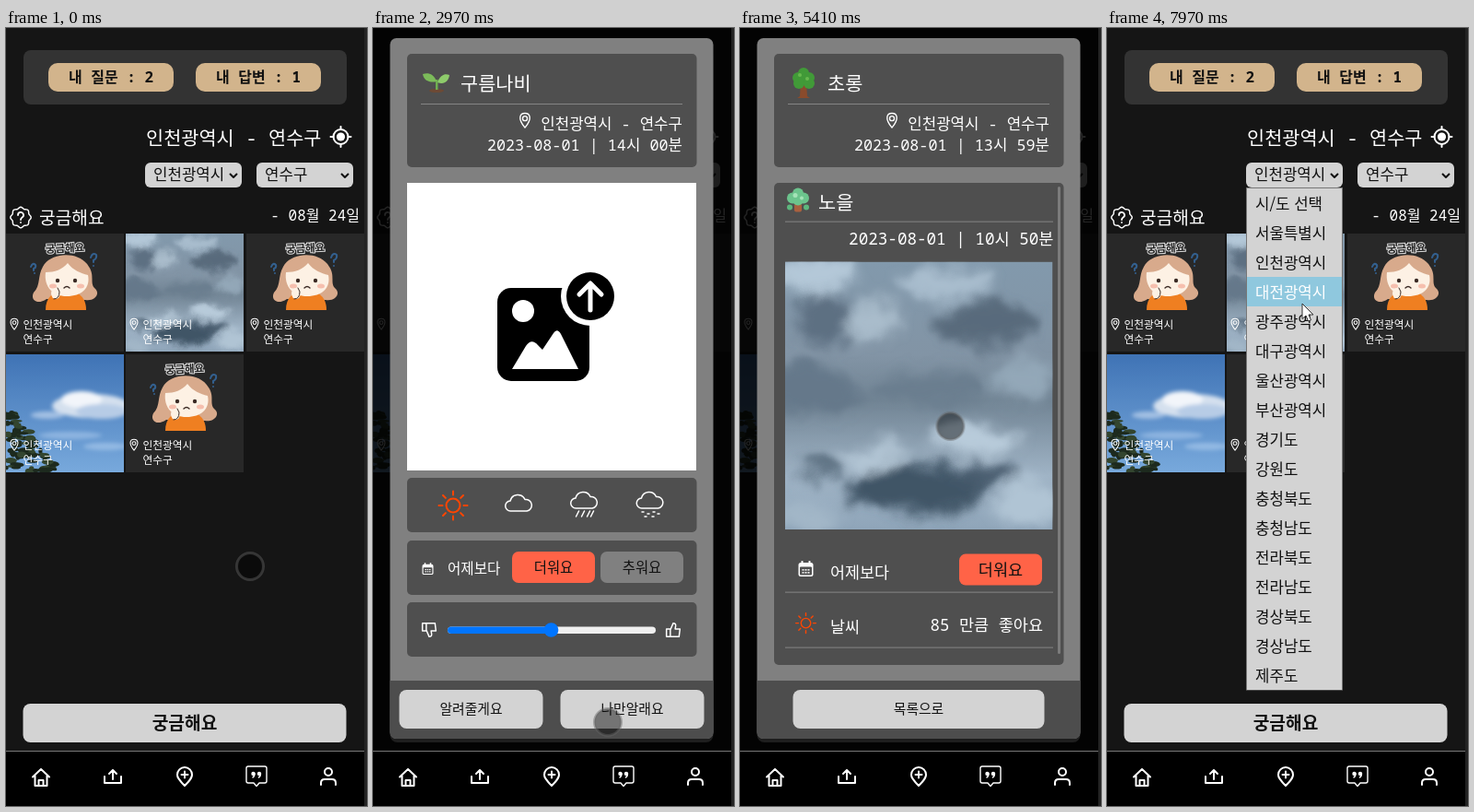
Animation, 392 px wide and 844 px high, one loop 8 s. Source, as an HTML page:

```html
<!DOCTYPE html>
<html lang="ko">
<head>
<meta charset="utf-8">
<style>
html, body { margin: 0; width: 100%; height: 100%; overflow: hidden; background: #151515; }
svg { position: absolute; left: 0; top: 0; }
text { font-family: "Noto Sans Mono", "Noto Sans CJK KR", "Noto Sans CJK JP", monospace; }
.sans { font-family: "Noto Sans CJK KR", "Noto Sans CJK JP", sans-serif; font-weight: 350; }
.line { fill: none; stroke: #fff; stroke-width: 2; stroke-linejoin: round; stroke-linecap: round; }
.thin { stroke-width: 1.4; }
.pointer { will-change: transform; overflow: visible; }
</style>
</head>
<body>
<script>
const LOOP = 8000;
const box = (x, y, w, h, fill, r = 0) =>
  `<rect x="${x}" y="${y}" width="${w}" height="${h}" rx="${r}" fill="${fill}"/>`;
const oval = (x, y, rx, ry, fill) => `<ellipse cx="${x}" cy="${y}" rx="${rx}" ry="${ry}" fill="${fill}"/>`;
const dot = (x, y, r, fill) => oval(x, y, r, r, fill);
const path = (d, fill) => `<path d="${d}" fill="${fill}"/>`;
const line = (d, cls = '', style = '') => `<path class="line ${cls}" d="${d}" style="${style}"/>`;
const put = (id, x, y, k = 1) => `<use href="#${id}" transform="translate(${x} ${y}) scale(${k})"/>`;
const text = (x, y, size, str, fill = '#fff', anchor = 'start', weight = 400, cls = '') =>
  `<text x="${x}" y="${y}" font-size="${size}" fill="${fill}" text-anchor="${anchor}" font-weight="${weight}" class="${cls}">${str}</text>`;
const button = (x, y, w, h, fill, label, size, weight = 500, r = 8) =>
  box(x, y, w, h, fill, r) + text(x + w / 2, y + h / 2 + size * .37, size, label, '#111', 'middle', weight);
const rule = (x1, x2, y) => box(x1, y, x2 - x1, 1, '#858585');

let seed = 7;
const rnd = () => (seed = seed * 16807 % 2147483647) / 2147483647;

const clouds = [
  [16, 6, 18, 8, '#b4c8d8'], [75, 10, 25, 7, '#a9bdce'], [97, 30, 24, 10, '#586b7c'],
  [18, 28, 14, 13, '#5d7082'], [42, 28, 12, 9, '#a9bccb'], [14, 62, 22, 12, '#65788a'],
  [70, 60, 30, 8, '#6b7e8f'], [112, 55, 16, 9, '#93a7b8'], [90, 84, 22, 8, '#b8cbda'],
  [44, 94, 18, 6, '#b3c6d5'], [62, 109, 34, 12, '#405466'], [94, 102, 14, 5, '#4b5f71'],
  [15, 101, 12, 4, '#566a7c'], [116, 114, 14, 10, '#b0c4d4'], [12, 121, 16, 6, '#a3b7c8']
].map(c => oval(...c)).join('');

const leaves = Array.from({ length: 85 }, () => {
  const y = 64 + rnd() * 64, reach = 10 + (y - 64) * .75;
  return oval(rnd() * reach, y, 2 + rnd() * 5, 1.5 + rnd() * 2, rnd() < .6 ? '#1d2a1e' : '#33452f');
}).join('');

const badge = Array.from({ length: 72 }, (_, i) => {
  const a = i * Math.PI / 36, r = 10.4 + .8 * Math.cos(8 * a);
  return `${(r * Math.cos(a)).toFixed(1)} ${(r * Math.sin(a)).toFixed(1)}`;
}).join('L');

const rays = Array.from({ length: 8 }, (_, i) => {
  const c = Math.cos(i * Math.PI / 4), s = Math.sin(i * Math.PI / 4);
  return `M${c * 11.5} ${s * 11.5}L${c * 15.5} ${s * 15.5}`;
}).join('');
const cloudLine = 'M-9 5a5.5 5.5 0 0 1-.5-11a8.5 8.5 0 0 1 16-1.5a6.3 6.3 0 0 1 2 12.5Z';

const defs = `<defs>
<clipPath id="sq"><rect width="128" height="128"/></clipPath>
<clipPath id="card"><rect x="37" y="168" width="314" height="523" rx="5"/></clipPath>
<linearGradient id="grey" x2="0" y2="1"><stop stop-color="#8299ac"/><stop offset=".35" stop-color="#8294a5"/>
<stop offset=".52" stop-color="#718494"/><stop offset=".8" stop-color="#a0b4c6"/><stop offset="1" stop-color="#8fa5b9"/></linearGradient>
<linearGradient id="blue" x2="0" y2="1"><stop stop-color="#3f73b5"/><stop offset="1" stop-color="#78a9dc"/></linearGradient>
<filter id="puff"><feGaussianBlur stdDeviation="3" result="b"/><feTurbulence type="fractalNoise" baseFrequency=".045" numOctaves="3" seed="4"/>
<feDisplacementMap in="b" scale="16" xChannelSelector="R" yChannelSelector="G"/></filter>
<filter id="soft"><feGaussianBlur stdDeviation="2"/></filter>
<g id="sky" clip-path="url(#sq)">${box(0, 0, 128, 128, 'url(#grey)')}<g filter="url(#puff)">${clouds}</g></g>
<g id="day" clip-path="url(#sq)">${box(0, 0, 128, 128, 'url(#blue)')}<g filter="url(#soft)">
${oval(92, 56, 42, 13, '#d4e0ee')}${oval(82, 49, 22, 9, '#f2f5fa')}${oval(104, 62, 28, 8, '#b7cce6')}
${oval(45, 66, 18, 4, '#a3c0e3')}${oval(70, 88, 34, 4, '#8db4e0')}${oval(108, 100, 24, 4, '#93b9e3')}</g>${leaves}</g>
<g id="girl">${box(0, 0, 128, 128, '#282828')}
<text x="64" y="20" font-size="11.5" font-weight="700" text-anchor="middle" transform="rotate(-3 64 16)" fill="#222" stroke="#ddd" stroke-width="2" paint-order="stroke">궁금해요</text>
${path('M40 36C48 20 80 18 90 36C97 46 90 54 97 60C103 66 95 74 86 72L44 71C34 78 26 72 30 64C38 56 34 46 40 36Z', '#d8aa8c')}
${path('M43 83C43 70 50 62 64 62C80 62 87 70 87 83Z', '#ef7f21')}
${path('M43 42C53 42 61 39 67 32C73 40 81 43 89 45C92 59 82 68 66 68C51 68 41 58 43 42Z', '#fdf1e4')}
${dot(56, 51, 2.2, '#3a2a24')}${dot(75, 51, 2.2, '#3a2a24')}${oval(51, 57, 4, 2.5, '#f6bfae')}${oval(81, 57, 4, 2.5, '#f6bfae')}
${line('M63 59q3-3 6 0', 'thin', 'stroke:#3a2a24')}${oval(54, 65, 5, 6, '#fdf1e4')}${line('M52 71q6 0 6-8l-2-4', 'thin', 'stroke:#3a2a24;stroke-width:1')}
<g class="line" style="stroke:#33608f"><path d="M27 36q2-5 5-2q1 3-2 4v2M31 43v.1M92 26q2-6 6-3q1 4-3 6v2M95 35v.1"/></g></g>
<g id="pin" class="line" style="stroke-width:1.1"><path d="M0 6.5C-7-2-4-6 0-6S7-2 0 6.5Z"/><circle cy="-1.5" r="2"/></g>
<g id="sun" class="line" style="stroke:#ff4500;stroke-width:2"><circle r="7.5"/><path d="${rays}"/></g>
<g id="cal">${box(-8, -7, 16, 15, '#fff', 2.5)}${box(-6.5, -2.5, 13, 9, '#4f4f4f', 1)}
${[-4, -1, 2].map(x => box(x, 0, 2, 1.5, '#fff') + box(x, 3, 2, 1.5, '#fff')).join('')}${box(-5, -9, 2, 4, '#fff')}${box(3, -9, 2, 4, '#fff')}</g>
<g id="thumb" class="line thin"><path d="M-7-1h4v8h-4ZM-3 0L0-7q3 0 2.5 3L2-1h5l-1 8h-9"/></g>
<g id="sprout">${path('M-1 5C-3-3-8-3-9-1', 'none')}${oval(0, 9, 8, 2, '#6d4a35')}${box(-1, -3, 2.5, 11, '#6fae50')}
${path('M0-1C-3-10-10-11-15-9C-14-2-7 1 0-1Z', '#7cbb5a')}${path('M1 0C4-8 9-10 14-8C13-1 8 3 1 0Z', '#8ecb6b')}</g>
<g id="tree">${path('M-3 0h6l1 15l3 2h-14l3-2Z', '#8a4b2c')}
${[[0, -10], [-6, -5], [6, -5], [0, -3], [-5, 1], [6, 1]].map(p => dot(...p, 6, '#419a38')).join('')}${dot(-4, -8, 2, '#67b94e')}${dot(4, -4, 2, '#67b94e')}</g>
<g id="bud">${box(-4, 3, 8, 9, '#a9603f', 2)}${[[0, -8], [-6, -3], [6, -3], [0, -1]].map(p => dot(...p, 6, '#6cc48d')).join('')}
${dot(-9, 7, 3, '#5db77d')}${dot(9, 7, 3, '#5db77d')}${dot(-3, -6, 2.5, '#a5e3b8')}${dot(4, -3, 2, '#a5e3b8')}</g>
</defs>`;

const cell = (id, x, y) => put(id, x, y) + put('pin', x + 9, y + 98, .95) +
  text(x + 18.5, y + 102.5, 11.7, '인천광역시') + text(x + 18.5, y + 118.5, 11.7, '연수구');
const select = (x, label) => box(x, 146, 105, 27, '#d3d3d3', 6) +
  text(x + 9, 165, 16.8, label, '#111', 'start', 350, 'sans') +
  line(`M${x + 92} 158l4 4l4-4`, '', 'stroke:#111;stroke-linecap:butt');

const page = box(0, 0, 392, 844, '#151515') +
  box(19, 24, 351, 59, '#333', 8) +
  button(46, 38, 136, 31, '#d2b48c', '내 질문 : 2', 16, 700, 10) +
  button(206, 38, 136, 31, '#d2b48c', '내 답변 : 1', 16, 700, 10) +
  text(342.5, 126.5, 20.8, '인천광역시 - 연수구', '#fff', 'end') +
  `<circle class="line" cx="363.5" cy="118" r="8"/>` + dot(363.5, 118, 4.6, '#fff') +
  line('M363.5 107v3M363.5 126v3M352.500 118h3M371.500 118h3') +
  select(151, '인천광역시') + select(272, '연수구') +
  `<g transform="translate(16 205.500)">${line('M' + badge + 'Z', 'thin')}${line('M-3-2.500a3 3 0 1 1 4.500 2.500q-1.500 1-1.500 2.500M0 5.500v.1', '', 'stroke-width:1.8')}</g>` +
  text(36, 212.5, 19.2, '궁금해요') + text(384, 209, 16, '- 08월 24일', '#fff', 'end') +
  cell('girl', 0, 223) + cell('sky', 130, 223) + cell('girl', 261, 223) +
  cell('day', 0, 354) + cell('girl', 130, 354) +
  button(18.5, 733, 351, 42, '#d3d3d3', '궁금해요', 19.2, 700);

const nav = box(0, 784, 389, 60, '#000') + box(0, 784, 389, 1, '#777') + box(389, 0, 3, 844, '#232323') +
  line('M29 812.500L38 804l9 8.500M31.500 811v11h13v-11M35.500 822v-6h5v6') +
  line('M107 812v7h18v-7M116 815v-9M112 809l4-4l4 4') +
  line('M194 822C185 813 186 811 186 810a8 8 0 0 1 16 0C202 812 202 814 194 822ZM190.500 810h7M194 806.500v7') +
  line('M263 801h18q2 0 2 2v14q0 2-2 2h-6l-3 3.500l-3-3.500h-6q-2 0-2-2v-14q0-2 2-2Z', 'thin') +
  dot(268.5, 809, 2.2, '#fff') + dot(275, 809, 2.2, '#fff') + line('M270 809q0 3-2 4M276.500 809q0 3-2 4', 'thin') +
  line('M342 821v-2q0-4 4-4h8q4 0 4 4v2') + `<circle class="line" cx="350" cy="807" r="4"/>`;

const modal = (icon, name, clock) => box(0, 0, 389, 784, 'rgba(0,0,0,.86)') +
  box(18.5, 11, 351, 760, '#808080', 7) +
  path('M18.500 708h351v56q0 7-7 7h-337q-7 0-7-7Z', '#4d4d4d') +
  box(37, 28, 314.5, 123, '#4f4f4f', 5) + put(icon, 69, 59) + text(95, 68, 20.8, name) + rule(52, 336, 82) +
  put('pin', 165, 100, 1.25) + text(336, 109.5, 16.8, '인천광역시 - 연수구', '#fff', 'end') +
  text(336, 132.5, 16.8, '2023-08-01 | ' + clock, '#fff', 'end');

const form = modal('sprout', '구름나비', '14시 00분') +
  box(37, 168, 314, 312, '#fff') + box(135, 282, 100, 101, '#000', 15) + dot(163, 307, 12, '#fff') +
  path('M151 370L166 345Q172 336 179 344L184 349L196 331Q200 325 204 332L223 370Z', '#fff') +
  dot(236, 291, 32, '#fff') + dot(236, 291, 26, '#000') + line('M236 306v-28M224 289l12-12l12 12', '', 'stroke-width:5') +
  [[488, 59], [556, 59], [623, 59]].map(([y, h]) => box(37, y, 314.5, h, '#4f4f4f', 5)).join('') +
  put('sun', 87, 518) +
  `<g class="line" style="stroke-width:1.5"><path transform="translate(158.500 519)" d="${cloudLine}"/>
   <path transform="translate(229.500 516)" d="${cloudLine}M-6 8l-3 6M0 8l-3 6M6 8l-3 6M10 8l-3 6"/>
   <path transform="translate(301 516)" d="${cloudLine}M-9 9h2M-3 11h2M3 9h2M8 11h2M-6 14h2M2 14h2"/></g>` +
  put('cal', 59.5, 587, .75) + text(81, 592, 15.6, '어제보다') +
  button(151, 568, 90, 34, '#ff6347', '더워요', 15.4, 500, 7) + button(247, 568, 90, 34, '#808080', '추워요', 15.4, 500, 7) +
  put('thumb', 326, 653, 1.05) + `<g transform="translate(61 653) scale(1 -1)">${put('thumb', 0, 0, 1.05)}</g>` +
  box(81, 649.5, 226, 7.5, '#efefef', 4) + box(81, 649.5, 112, 7.5, '#0075ff', 4) + dot(193.5, 653, 7.8, '#0075ff') +
  button(28.5, 718, 156, 42, '#d3d3d3', '알려줄게요', 14.8) + button(203.5, 718, 156, 42, '#d3d3d3', '나만알래요', 14.8);

const detail = modal('tree', '초롱', '13시 59분') + box(37, 168, 314.5, 523, '#4f4f4f', 5) +
  `<g clip-path="url(#card)"><g id="scroll">` +
  put('bud', 63, 194) + text(85, 203, 20.8, '노을') + rule(49, 340, 216) +
  text(340.5, 241, 17.6, '2023-08-01 | 10시 50분', '#fff', 'end') + put('sky', 49, 260, 290.5 / 128) +
  put('cal', 71.5, 593.5) + text(98, 603, 17.4, '어제보다') + button(238, 577, 90, 34, '#ff6347', '더워요', 17.5, 500, 7) + rule(49, 340, 618) +
  put('sun', 71.5, 652, .7) + text(98, 662, 17.4, '날씨') + text(329, 660, 17.5, '85 만큼 좋아요', '#fff', 'end') + rule(49, 340, 678) +
  `</g></g><g id="bar">${box(345, 172, 3, 507, '#7c7c7c', 1.5)}</g>` +
  button(57.5, 718, 273, 42, '#d3d3d3', '목록으로', 14.8);

const regions = ('시/도 선택,서울특별시,인천광역시,대전광역시,광주광역시,대구광역시,울산광역시,부산광역시,' +
  '경기도,강원도,충청북도,충청남도,전라북도,전라남도,경상북도,경상남도,제주도').split(',');
const menu = box(151, 173, 105, 545.5, '#777') + box(152, 174, 103, 544, '#d3d3d3') +
  `<rect id="mark" x="152" width="103" height="32" fill="#8fc8de"/>` +
  regions.map((r, i) => text(161, 196.5 + i * 32, 16.8, r, '#111', 'start', 350, 'sans option')).join('');

document.body.innerHTML = `<svg width="392" height="844">${defs}${page}
<g id="form">${form}</g><g id="detail">${detail}</g><g id="menu">${menu}</g>${nav}</svg>
<svg class="pointer" id="touch" width="1" height="1"><circle r="14.500" fill="rgba(0,0,0,.45)"/>
<circle r="14.500" fill="none" stroke="rgba(100,100,100,.45)" stroke-width="3"/></svg>
<svg class="pointer" id="arrow" width="1" height="1"><path d="M0 0V16.500L4 13L6.500 19L9.500 17.800L7 12H12Z" fill="#fff" stroke="#333"/></svg>`;

const $ = id => document.getElementById(id);
const options = document.querySelectorAll('.option');
const show = (id, on) => $(id).style.display = on ? '' : 'none';
const clamp = v => Math.min(1, Math.max(0, v));
const ease = v => v * v * (3 - 2 * v);

// time, x, y
const touchPath = [[0, 265, 584], [560, 265, 584], [1360, 103, 300], [1640, 103, 300], [2330, 212, 677],
  [2970, 255, 753], [3430, 255, 753], [4230, 215, 299], [4330, 215, 299], [4830, 230, 439], [5200, 230, 439],
  [5500, 228, 430], [6010, 218, 735], [6310, 216, 758], [6400, 216, 758], [6900, 232, 194], [7090, 231, 183]];
const arrowPath = [[7480, 230, 205], [7770, 212, 299]];

function move(id, keys, t) {
  const i = Math.max(0, keys.findLastIndex(k => k[0] <= t));
  const a = keys[i], b = keys[i + 1] || a;
  const p = a === b ? 0 : ease(clamp((t - a[0]) / (b[0] - a[0])));
  $(id).style.transform = `translate(${a[1] + (b[1] - a[1]) * p}px, ${a[2] + (b[2] - a[2]) * p}px)`;
}

function draw(now) {
  const t = now % LOOP;
  show('form', t >= 1550 && t < 3460);
  show('detail', t >= 4330 && t < 6400);
  show('menu', t >= 7280);
  show('touch', t < 7480);
  show('arrow', t >= 7480);
  $('scroll').setAttribute('transform', `translate(0 ${-9 * ease(clamp((t - 5250) / 250))})`);
  $('bar').setAttribute('opacity', 1 - clamp((t - 5700) / 200));
  const row = t >= 7970 ? 3 : 2;
  $('mark').setAttribute('y', 174 + row * 32);
  options.forEach((o, i) => o.setAttribute('fill', i === row ? '#fff' : '#111'));
  move('touch', touchPath, t);
  move('arrow', arrowPath, t);
  requestAnimationFrame(draw);
}
requestAnimationFrame(draw);
</script>
</body>
</html>
```
